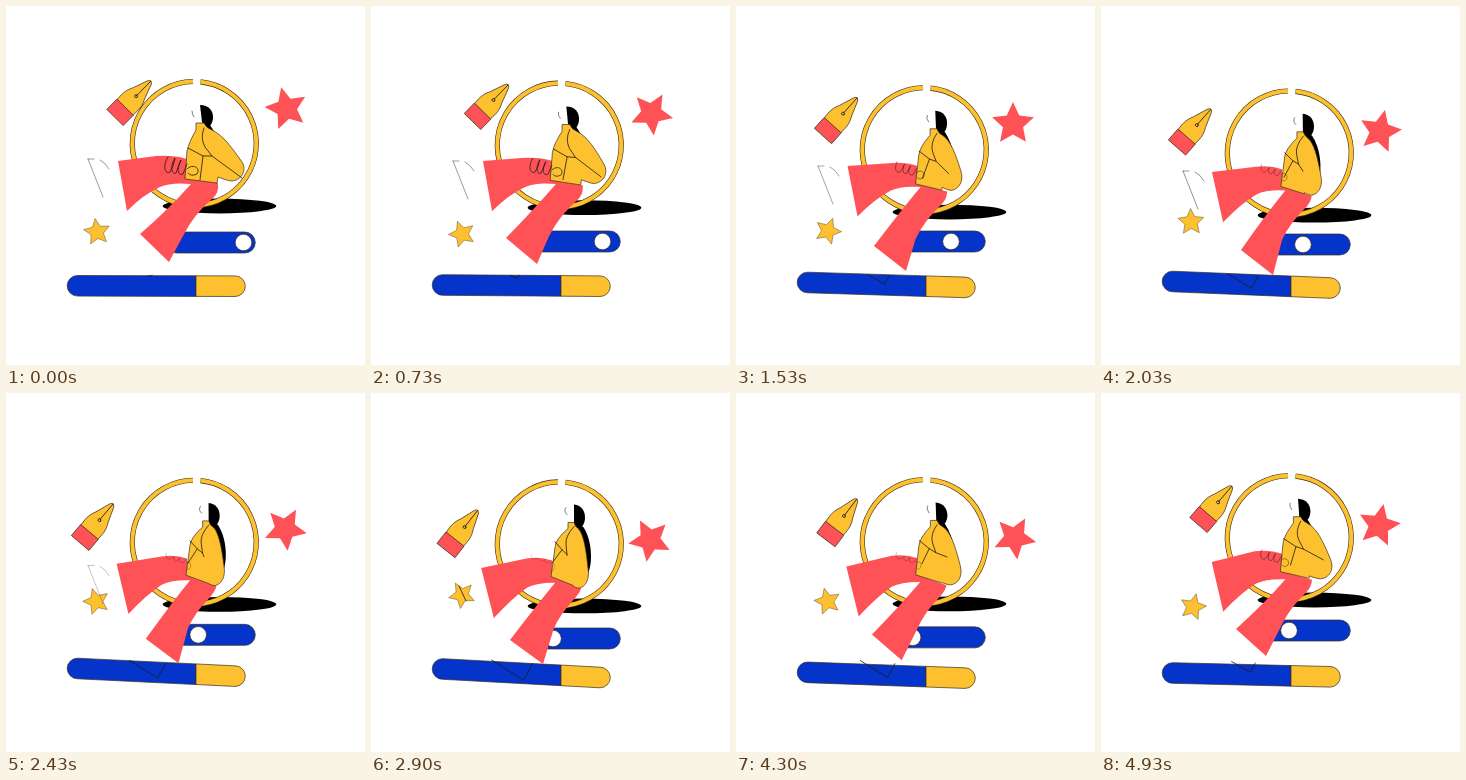
Write an HTML page that moves like this. It is 359x359 px and loops after 5000 ms.

```html
<!DOCTYPE html>
<html>
<head>
<meta charset="utf-8">
<style>
html, body { margin: 0; width: 100%; height: 100%; overflow: hidden; background: #fff; }
svg { display: block; width: 100vw; height: 100vh; }
.line { fill: none; stroke: #1d1a1a; stroke-width: .8; stroke-linecap: round; stroke-linejoin: round; }
.edge { stroke: #3b2d1a; stroke-width: .7; stroke-linejoin: round; }
.yellow { fill: #fdc02f; }
.red { fill: #ff5256; }
.blue { fill: #0434ca; }
</style>
</head>
<body>
<svg viewBox="0 0 359 359">
  <ellipse id="shadow" cx="213.5" rx="56.8" ry="7.4"/>
  <g id="ring" fill="none">
    <path d="M194.5 75.3A62 62 0 1 1 187 75" stroke="#3b2d1a" stroke-width="5.2"/>
    <path d="M194.5 75.3A62 62 0 1 1 187 75" stroke="#fdc02f" stroke-width="4"/>
  </g>
  <g id="toggle">
    <rect class="blue edge" x="160" y="-10.5" width="89.3" height="21" rx="10.5"/>
    <circle id="knob" r="8.3" fill="#fff" class="edge"/>
  </g>
  <path id="bigStar" class="red"/>
  <path id="smallStar" class="yellow edge" style="stroke-width:.4"/>
  <path id="shoe" class="line"/>
  <path id="strap" class="line"/>
  <path id="barBlue" class="blue edge"/>
  <path id="barYellow" class="yellow edge"/>
  <path id="foot" class="line"/>
  <path id="legs" class="red"/>
  <path id="tail"/>
  <path id="hair"/>
  <path id="face" class="line" opacity=".7"/>
  <path id="torso" class="yellow edge"/>
  <path id="folds" class="line"/>
  <path id="hand" class="line"/>
  <g id="pen">
    <path class="yellow edge" d="M-11-14C-12-24-11-28-8-34L-2.6-49Q0-53.5 2.6-49L8-34C11-28 12-24 11-14Z"/>
    <path class="red edge" d="M-11.5 0V-14.5H11.5V0Z"/>
    <path class="line" d="M0-51V-31"/>
    <circle cy="-30" r="1.5" class="line"/>
  </g>
</svg>
<script>
const LOOP = 5000;
const KEYS = [0, 15, 31, 41, 58, 73, 99];
const $ = id => document.getElementById(id);
const set = (id, name, value) => $(id).setAttribute(name, value);
const mix = (a, b, p) => a + (b - a) * p;

// Smooth curve through one value per key
function curve(n, ...v) {
  const last = KEYS.length - 1;
  const slope = i => {
    if (i === 0) return 0;
    const j = Math.min(i + 1, last);
    return (v[j] - v[i - 1]) / (KEYS[j] - KEYS[i - 1]);
  };
  let i = 0;
  while (i < last - 1 && n >= KEYS[i + 1]) i++;
  const w = KEYS[i + 1] - KEYS[i], x = (n - KEYS[i]) / w, x2 = x * x, x3 = x2 * x;
  return v[i] * (2 * x3 - 3 * x2 + 1) + v[i + 1] * (3 * x2 - 2 * x3)
    + w * (slope(i) * (x3 - 2 * x2 + x) + slope(i + 1) * (x3 - x2));
}

// Blend two paths of equal structure, x and y separately
function morph(a, b, px, py) {
  const to = b.match(/-?[\d.]+/g);
  let k = 0;
  return a.replace(/-?[\d.]+/g, m => mix(+m, +to[k], k++ % 2 ? py : px).toFixed(2));
}

function star(cx, cy, r, turn) {
  let d = "";
  for (let i = 0; i < 10; i++) {
    const a = (turn + i * 36) * Math.PI / 180, len = i % 2 ? r * .48 : r;
    d += (i ? "L" : "M") + (cx + len * Math.sin(a)).toFixed(2) + " " + (cy - len * Math.cos(a)).toFixed(2);
  }
  return d + "Z";
}

function drawBar(n, q) {
  const l = curve(n, 279.8, 279, 276.5, 275.5, 276, 278.5, 280);
  const r = curve(n, 280.2, 280.2, 281.4, 282, 284.5, 286, 283.8);
  const m = mix(l, r, .75), R = 10.3;
  set("barBlue", "d", `M190 ${m - R}L71.5 ${l - R}A${R} ${R} 0 0 0 71.5 ${l + R}L190 ${m + R}Z`);
  set("barYellow", "d", `M190 ${m - R}L229 ${r - R}A${R} ${R} 0 0 1 229 ${r + R}L190 ${m + R}Z`);
  set("foot", "d", morph("M142,270 L145,270 L146,269", "M120,267 L153,288 L162,271", q, q));
}

function drawLegs(n, q) {
  const u = curve(n, 0, 0, .23, .5, .91, 1, .64);
  const lx = curve(n, 134, 135, 138, 140, 139, 137, 135);
  const ly = curve(n, 228, 232, 240, 244, 247, 246, 236);
  const rx = curve(n, 163, 166, 170, 172, 172, 167, 165);
  const ry = curve(n, 256, 258, 265, 269, 271, 271, 263);
  set("legs", "d",
    morph("M121,205 L112,155", "M123,227 L110,177", u, u) +
    morph("L150,150 Q168,149 181,153 L181,172 L212,177 Q213,187 207,192 Q188,208 177,230",
          "L157,166 Q170,164 181,168 L181,184 L210,196 Q209,200 202,208 Q189,222 183,236", q, q) +
    `L${rx} ${ry}L${lx} ${ly}` +
    morph("Q163,203 185,178 Q165,176 154,181 Q138,188 121,205",
          "Q166,213 184,191 Q166,191 156,196 Q141,207 123,227", q, u) + "Z");
}

function drawBody(n, q) {
  const s = curve(n, 0, .15, .585, .85, 1, .88, .34);
  set("torso", "d", morph(
    "M190,117 L198,117 Q200,122 206,124 C218,130 226,142 236,156 C241,164 236,174 226,175 C222,175 215,172 212,171 L211,177 L179,173 L181,145 Q183,136 190,124 Z",
    "M197,130 L203,130 Q204,134 207,136 C212,140 215,155 217,176 C219,188 214,195 208,196 C206,196 203,195 202,194 L202,193 L180,184 L184,155 Q184,147 197,136 Z", s, q));
  set("folds", "d", morph(
    "M198,122 Q194,132 199,141 L206,150 L197,150 L182,142 M197,150 L194,174 M206,150 L236,172",
    "M203,134 Q194,144 195,152 L196,162 L191,157 L184,149 M191,157 L181,170 M196,162 L196,162", s, q));
  set("hair", "d", morph(
    "M194,99 C203,99 207,105 207,111 C207,118 203,122 199,123 L196,116 Z",
    "M203,112 C211,113 214,119 214,125 C214,131 211,136 205,137 L203,135 Z", s, q));
  set("tail", "d", morph(
    "M198,119 L204,119 C213,132 218,148 220,162 L208,155 Z",
    "M204,133 L212,134 C221,147 222,170 217,181 L208,155 Z", s, q));
  set("face", "d", morph(
    "M186,105 Q186,109 188,111", "M195,115 Q192,118 196,122", s, q));
  set("hand", "d", morph(
    "M162,151 C156,160 159,169 164,166 Q168,160 169,152 C164,160 165,169 170,167 L175,154 C170,164 172,170 177,168 L181,158 M181,163 C187,157 195,162 191,168 Q185,171 182,167",
    "M160,162 C160,164 161,166 164,166 Q166,166 168,166 C168,167 169,168 171,168 L174,167 C173,168 174,170 177,170 L180,168 M180,171 C182,169 184,173 183,176 Q182,179 181,178", q, q));
  set("hand", "opacity", Math.max(.2, 1 - .8 * q));
}

function drawPen(n) {
  const x = curve(n, 109, 101.5, 87, 76, 75, 82.5, 97.5);
  const y = curve(n, 111.5, 115.5, 130, 141.5, 157.5, 159, 132);
  const a = curve(n, 44.6, 44.2, 41.8, 41.5, 38.3, 34.7, 40.7);
  set("pen", "transform", `translate(${x} ${y}) rotate(${a})`);
}

function drawStars(n, q) {
  set("bigStar", "d", star(
    curve(n, 280.5, 280.5, 277, 279, 279, 279, 278),
    curve(n, 102.5, 107.5, 118, 125.5, 147, 154, 132.5), 22,
    curve(n, -14, 30, 72, 85, 117, 115, 84)));
  set("smallStar", "d", star(
    curve(n, 91, 91, 92, 90, 91, 91, 92),
    curve(n, 226, 228, 225, 216, 202, 203.5, 214), 13.6, -8 - 97 * q));
}

function drawShoe(n, q) {
  const y = curve(n, 153, 155, 160, 165, 180, 182, 170);
  const thin = curve(n, .55, .55, .5, .6, 0, 0, 0);
  set("shoe", "d", `M82 ${y}L97 ${y + 38}M82 ${y}h6M94 ${y + 1}Q99 ${y + 3} 103 ${y + 10}`);
  set("shoe", "opacity", Math.max(0, thin));
  const cut = n > 50 && n < 86;
  set("strap", "d", cut ? "M88 193L95 208" : "");
  if (cut) $("smallStar").after($("strap"));
}

function draw(t) {
  t %= LOOP;
  const n = 2 * Math.floor(t / 100) + (t % 100 >= 30 ? 1 : 0);
  const q = (1 - Math.cos(2 * Math.PI * n / 133)) / 2;
  set("shadow", "cy", 200 + 13.5 * q);
  set("ring", "transform", `translate(0 ${.5 + 14 * q})`);
  set("toggle", "transform",
    `translate(0 ${curve(n, 236.5, 235.5, 235.5, 238.5, 245.5, 249.5, 237.5)})`);
  set("knob", "cx", curve(n, 237.5, 231.5, 215, 202, 182, 169, 188));
  drawBar(n, q);
  drawLegs(n, q);
  drawBody(n, q);
  drawStars(n, q);
  drawShoe(n, q);
  drawPen(n);
}

function tick() {
  draw(performance.now());
  requestAnimationFrame(tick);
}
tick();
</script>
</body>
</html>
```
